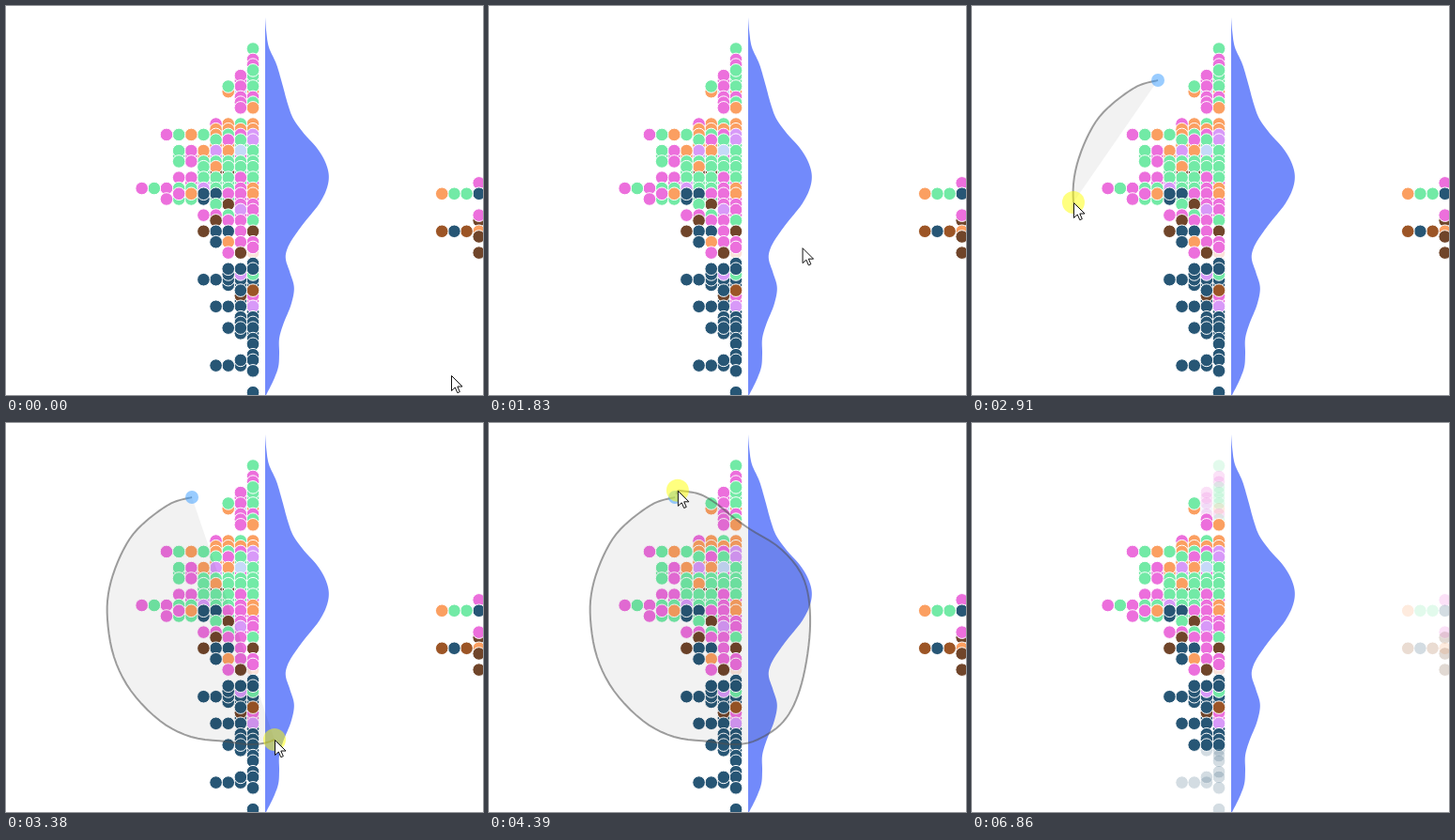
These frames come from a looping animation (508x414 px, 7460 ms). An HTML page:

```html
<!DOCTYPE html>
<html lang="en">
<head>
<meta charset="utf-8">
<title>Lasso selection</title>
<style>
  html, body { margin: 0; width: 100%; height: 100%; overflow: hidden; background: #fff; }
  svg { display: block; width: 508px; height: 414px; }
  #dots circle { stroke: #fff; stroke-width: 1; }
  .selected .out { opacity: .2; }
  #loop { fill: #000; fill-opacity: .05; }
  #loop, #chord { stroke: #505050; stroke-opacity: .55; stroke-width: 2; }
  #chord { stroke-dasharray: 4 4; }
</style>
</head>
<body>
<svg viewBox="0 0 508 414">
  <path id="violin" fill="#728afb"/>
  <g id="dots"></g>
  <g id="lasso">
    <path id="loop"/>
    <path id="chord"/>
    <circle cx="198" cy="79" r="7" fill="#39f" fill-opacity=".5"/>
    <circle id="press" r="12" fill="#ff0" fill-opacity=".5"/>
  </g>
  <path id="cursor" d="M.5 .5V16.5L4.3 13L6.8 18.7L9.3 17.6L6.8 12H12Z" fill="#fff" stroke="#111"/>
</svg>
<script>
const $ = id => document.getElementById(id);
const LOOP_MS = 7460, RELEASE = 4790, SELECT = 5000;

// Mouse moves: start ms, end ms, number of steps.
const MOVES = [[70, 500, 8], [1360, 2100, 12], [2170, 2300, 3], [2510, 3250, 12],
  [3310, 3990, 11], [4060, 4460, 7], [6520, 6860, 6]];

// Curve points: step, x, y.
const DRAG = [[23, 198, 79], [25, 173, 87], [27, 140, 113], [28, 122, 141], [29, 110, 176],
  [30, 108, 209], [31, 115, 249], [32, 133, 285], [33, 164, 317], [34, 197, 334],
  [35, 234, 339], [36, 262, 342], [37, 286, 337], [38.5, 315, 316], [40, 333, 277],
  [41.5, 342, 217], [43, 336, 168], [44, 312, 135], [45, 278, 113], [46, 261, 101],
  [48, 241, 85], [50, 222, 75], [53, 193, 71]];
const CURVES = [
  [[0, 474, 393], [8, 376, 189]],
  [[8, 376, 189], [15, 349, 278]],
  [[15, 349, 278], [20, 244, 135], [23, 212, 79]],
  DRAG,
  [[53, 193, 71], [59, 436, 445]]
];

// Density outline: y, x.
const DENSITY = [[12, 276], [28, 277.3], [44, 280], [62, 288], [84, 294.5], [104, 300], [120, 306],
  [136, 317.5], [151, 331], [166, 340], [181, 343.8], [196, 341], [212, 332.5], [230, 318],
  [248, 305], [260, 299], [270, 298], [284, 302.5], [300, 306.8], [318, 303.5], [338, 295.5],
  [354, 291], [370, 291], [384, 290], [398, 285], [414, 277]];

const COLORS = { g: '#72eaa6', p: '#ec6fdc', o: '#fb9f61', n: '#275675', b: '#70452a',
  r: '#9c5526', v: '#d899f8', l: '#c6d9f8', e: '#fbe2da' };

// Row number and its dots from right to left, in paint order.
const MAIN = '0g 2p 3p 6gp 5gp 4g 8olo 7gpg 9pp 10gp 11op 14ogop 15oooo 16vpgogogp 18ggoo ' +
  '17vgpg 20gpgvopg 19glovopg 21gggggpg 23ggbbg 22gggog 25pgggvp 24gpgggpp 26opggvggpgp ' +
  '28ppggnggp 27oppnnop 29ppbg 31ppgpp 30pv 32gppb 34bpnnb 36ppon 38ebp 37p 40n 44nnn ' +
  '43nnnnn 42gvn 41nnn 47pn 46pb 45rn 49n 48vnnn 50nn 51nn 53nn 52nnn 54n 55n 57n ' +
  '59.nnn 58nn 60n 64n';
const SIDE = '25p 27nggo 32b 31p 34ornr 35b 38b';

function at(curve, u) {
  let i = 0;
  while (i < curve.length - 2 && u > curve[i + 1][0]) i++;
  const p = [i - 1, i, i + 1, i + 2].map(k => curve[Math.min(Math.max(k, 0), curve.length - 1)]);
  const s = (u - p[1][0]) / (p[2][0] - p[1][0]);
  return [1, 2].map(k => {
    const [a, b, c, d] = p.map(q => q[k]);
    return b + s / 2 * (c - a + s * (2 * a - 5 * b + 4 * c - d + s * (3 * (b - c) + d - a)));
  });
}

function trace(curve, from, to, step) {
  const pts = [];
  for (let u = from; u < to; u += step) pts.push(at(curve, u));
  pts.push(at(curve, to));
  return 'M' + pts.map(p => p.map(v => v.toFixed(2))).join('L');
}

function addDots(rows, right, isOut) {
  for (const [, row, cells] of rows.matchAll(/(\d+)(\S+)/g)) {
    [...cells].forEach((c, col) => {
      if (c === '.') return;
      const dot = document.createElementNS('http://www.w3.org/2000/svg', 'circle');
      dot.setAttribute('cx', right - col * 13.15);
      dot.setAttribute('cy', 45.5 + row * 5.714);
      dot.setAttribute('r', 6.8);
      dot.setAttribute('fill', COLORS[c]);
      if (isOut(+row, col)) dot.setAttribute('class', 'out');
      $('dots').append(dot);
    });
  }
}

function stepAt(t) {
  return MOVES.reduce((sum, [a, b, n]) =>
    sum + (t < a ? 0 : Math.min(n, Math.floor((t - a) / (b - a) * (n - 1) + .1) + 1)), 0);
}

function draw(t) {
  const u = stepAt(t);
  const [x, y] = at(CURVES.find(c => u <= c[c.length - 1][0]), u);
  const dragging = u > 23 && t < RELEASE;
  $('cursor').setAttribute('transform', `translate(${x} ${y})`);
  $('dots').setAttribute('class', t >= SELECT ? 'selected' : '');
  $('lasso').setAttribute('visibility', dragging ? 'visible' : 'hidden');
  if (!dragging) return;
  $('loop').setAttribute('d', trace(DRAG, 23, u, .2));
  $('chord').setAttribute('d', Math.hypot(x - 198, y - 79) < 100 ? `M${x} ${y}L198 79` : '');
  $('press').setAttribute('cx', x);
  $('press').setAttribute('cy', y);
}

$('violin').setAttribute('d', trace(DENSITY.map(([y, x]) => [y, x, y]), 12, 414, 2) + 'H276Z');
addDots(MAIN, 263, (row, col) => row > 52 || row < ([11, 10][col] ?? 7));
addDots(SIDE, 503.7, () => true);

const start = performance.now();
function tick() {
  draw((performance.now() - start) % LOOP_MS);
  requestAnimationFrame(tick);
}
tick();
</script>
</body>
</html>
```
